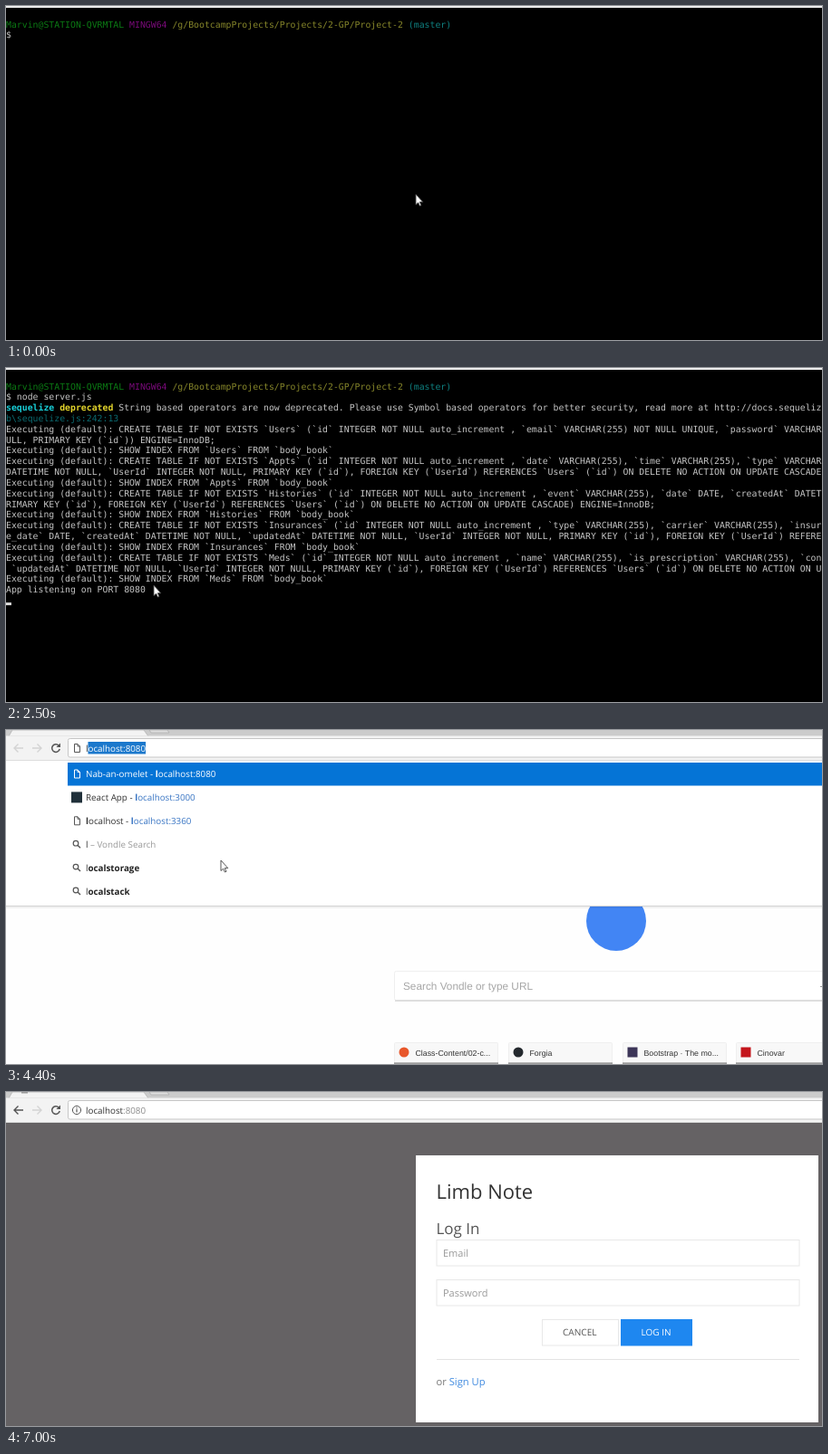
Animation, 900 px wide and 369 px high, one loop 7.1 s. Source, as an HTML page:

```html
<!DOCTYPE html>
<html lang="en">
<head>
<meta charset="utf-8">
<title>Server start and log in</title>
<style>
html, body { margin: 0; width: 100%; height: 100%; overflow: hidden; background: #000; }
svg { display: block; width: 100vw; height: 100vh; }
text { white-space: pre; text-rendering: geometricPrecision; }
.mono { font-family: "DejaVu Sans Mono", monospace; }
.ui { font-family: "Open Sans", "Noto Sans", sans-serif; }
.page { font-family: "Liberation Sans", sans-serif; }
</style>
</head>
<body>
<svg id="stage" viewBox="0 0 900 369"></svg>
<script>
const LOOP = 7100, CHAR = 5.918, ROW = 11.83;
const BROWSER = 3400, TYPE_URL = 4300, ENTER = 5350, LOADED = 5800;
const clamp = v => Math.max(0, Math.min(1, v));

const rect = (x, y, w, h, fill, extra = '') =>
  `<rect x="${x}" y="${y}" width="${w}" height="${h}" fill="${fill}" ${extra}/>`;
const circle = (x, y, r, fill, extra = '') =>
  `<circle cx="${x}" cy="${y}" r="${r}" fill="${fill}" ${extra}/>`;
const line = (d, color, width = 1.2) =>
  `<path d="${d}" fill="none" stroke="${color}" stroke-width="${width}"/>`;
const text = (x, y, s, size, fill, cls = 'ui') =>
  `<text class="${cls}" x="${x}" y="${y}" font-size="${size}" fill="${fill}">${s}</text>`;
const span = (s, fill, bold) =>
  `<tspan${fill ? ` fill="${fill}"` : ''}${bold ? ' font-weight="700"' : ''}>${s}</tspan>`;

// Terminal
const create = (name, columns) => 'Executing (default): CREATE TABLE IF NOT EXISTS `' + name +
  '` (`id` INTEGER NOT NULL auto_increment , ' + columns;
const show = name => 'Executing (default): SHOW INDEX FROM `' + name + '` FROM `body_book`';
const key = 'PRIMARY KEY (`id`), FOREIGN KEY (`UserId`) REFERENCES `Users` (`id`) ' +
  'ON DELETE NO ACTION ON UPDATE CASCADE';
const userKey = 'DATETIME NOT NULL, `UserId` INTEGER NOT NULL, ' + key;
const command = 'node server.js';
const prompt = span('Marvin@STATION-QVRMTAL ', '#0b7a14') + span('MINGW64 ', '#7a0a7a') +
  span('/g/BootcampProjects/Projects/2-GP/Project-2 ', '#86862a') + span('(master)', '#0f8080');
const output = [
  span('sequelize ', '#18cfd8', true) + span('deprecated ', '#e3d52c', true) +
    'String based operators are now deprecated. Please use Symbol based operators ' +
    'for better security, read more at http://docs.sequelizejs',
  span('b\\sequelize.js:242:13', '#0b6a70'),
  create('Users', '`email` VARCHAR(255) NOT NULL UNIQUE, `password` VARCHAR'),
  'ULL, PRIMARY KEY (`id`)) ENGINE=InnoDB;',
  show('Users'),
  create('Appts', '`date` VARCHAR(255), `time` VARCHAR(255), `type` VARCHAR'),
  userKey,
  show('Appts'),
  create('Histories', '`event` VARCHAR(255), `date` DATE, `createdAt` DATETIME'),
  key.slice(1) + ') ENGINE=InnoDB;',
  show('Histories'),
  create('Insurances', '`type` VARCHAR(255), `carrier` VARCHAR(255), `insurance'),
  'e_date` DATE, `createdAt` DATETIME NOT NULL, `updatedAt` ' + userKey,
  show('Insurances'),
  create('Meds', '`name` VARCHAR(255), `is_prescription` VARCHAR(255), `condition'),
  ' `updatedAt` ' + userKey,
  show('Meds'),
  'App listening on PORT 8080'
];
const baseline = row => 23.5 + ROW * row;
const termLine = (row, s) => text(0, baseline(row), s, 9.83, '#c4c4c4', 'mono');

function terminal(t) {
  const typed = command.slice(0, Math.max(0, Math.floor((t - 100) / 75)));
  const count = t < 1300 ? 0 : Math.min(output.length, 2 + 6 * Math.floor((t - 1300) / 100));
  let s = rect(0, 0, 900, 369, '#000') + rect(0, 0, 900, 2, '#ececec');
  s += termLine(0, prompt) + termLine(1, '$ ' + typed);
  output.slice(0, count).forEach((l, i) => s += termLine(i + 2, l));

  const cells = Math.ceil(5 * clamp((t - 2600) / 200));
  if (cells) {
    const x = (26 - cells) * CHAR;
    s += rect(x, 238, cells * CHAR + 1, 13, '#f2f2f2') +
      text(x, baseline(19), ' 8080'.slice(-cells), 9.83, '#333', 'mono');
  } else if (t >= 100 && t % 1000 < 750) {
    const [col, row] = count ? [0, count + 2] : [2 + typed.length, 1];
    s += rect(col * CHAR, baseline(row) - 1, CHAR, 3, '#ddd');
  }
  return s;
}

// Browser chrome
const fileIcon = (y, color) =>
  line(`M75.5 ${y - 4.5}h3.5l2.5 2.5v6.5h-6zM79 ${y - 4.5}v2.5h2.5`, color, 1);
const lens = y => circle(77, y - 1, 2.8, 'none', 'stroke="#555" stroke-width="1.2"') +
  line(`M79 ${y + 1}l3 3`, '#555', 1.4);
const info = circle(78, 20, 4.6, 'none', 'stroke="#555"') + line('M78 19v3.6M78 17v1.2', '#555');
const reload = line('M58.2 17.2a4.3 4.3 0 1 0 1 3.8', '#555', 1.5) +
  '<path d="M60 14.5v4.6h-4.6z" fill="#555"/>';
const stop = line('M51 16l8 8M59 16l-8 8', '#555', 1.5);

function toolbar(backColor, button, icon, address) {
  return rect(0, 0, 900, 7, '#cbcbcb') +
    '<path d="M3 7L7 0H152L157 7Z" fill="#f3f3f3" stroke="#b5b5b5" stroke-width=".8"/>' +
    '<path d="M158 0L160 3H180L178 0Z" fill="#dedede" stroke="#aaa" stroke-width=".7"/>' +
    rect(0, 6.5, 900, 27, '#f3f3f3') + rect(0, 33, 900, 1, '#dcdcdc') +
    rect(68.5, 9.5, 840, 20.5, '#fff', 'rx="2" stroke="#c6c6c6"') +
    line('M19 20H9M13.5 15.5L9 20l4.5 4.5', backColor, 1.4) +
    line('M29 20h10M34.5 15.5L39 20l-4.5 4.5', '#d4d4d4', 1.4) +
    button + icon + address;
}

const BLACK = '#24292e', ORANGE = '#e8572b';
const badge = (x, y, color, shape, r = 5.5) =>
  shape === 'o' ? circle(x, y, r, color) : rect(x - r, y - r, 2 * r, 2 * r, color);
const bookIcon = line('M387 44.5v8.5M381.5 43.5h4l1.5 1l1.5-1h4v8.5h-4l-1.5 1l-1.5-1h-4z' +
  'M383 46.5h2.5M383 49h2.5M388.5 46.5h2.5M388.5 49h2.5', '#444', 1.1);
const bookmarks = [
  [64, "The world's leading", badge(64, 48, BLACK, 'o')],
  [175, 'Marvin Doyle | Wor', badge(175, 48, '#0a73b4', 's')],
  [286, 'My Profile - Plim', badge(286, 48, '#2d8cff', 'o')],
  [387, 'Module #2 - So You', bookIcon],
  [498, 'Keypad Drills | Pra', badge(498, 48, '#a9cdec', 's')],
  [609, '(7) 24/7 openLoopR', badge(609, 48, '#d61f1f', 's', 5)],
  [720, 'TrainingNook', badge(720, 48, '#3f434a', 's', 5)],
  [808, 'Class-Content/02-c', badge(808, 48, ORANGE, 'o')]
];

let bookmarkBar = rect(0, 34, 900, 28, '#fefefe') + rect(0, 62, 900, 1, '#dedede');
for (let i = 0; i < 9; i++)
  bookmarkBar += rect(9 + i % 3 * 4, 43 + Math.floor(i / 3) * 4, 2.6, 2.6,
    ['#e0483a', '#e8a33a', '#4a9b58'][Math.floor(i / 3)]);
bookmarkBar += text(30, 51, 'Apps', 8.5, '#333');
// Long titles fade out before the next icon
for (const [x, label, icon] of bookmarks)
  bookmarkBar += icon + text(x + 15, 51, label, 8.5, '#333') +
    (label.length > 17 ? rect(x + 82, 40, 24, 16, 'url(#fade)') : '');

const tiles = [
  [428, 'Class-Content/02-c...', ORANGE, 'o'],
  [554, 'Forgia', BLACK, 'o'],
  [680, 'Bootstrap · The mo...', '#3c3558', 's'],
  [805, 'Cinovar', '#c4161c', 's']
];
let startPage = rect(0, 34, 900, 335, '#fefefe') + circle(673, 211, 33, '#4285f4') +
  rect(428.5, 266.5, 490, 32, '#fff', 'rx="2" stroke="#efefef"') +
  rect(429, 298.5, 490, 1.2, '#cfcfcf') +
  text(438, 287, 'Search Vondle or type URL', 11.8, '#a6a6a6', 'page') +
  rect(898, 283, 2, 1, '#999');
for (const [x, label, color, shape] of tiles)
  startPage += rect(x + .5, 345.5, 114, 24, '#f8f8f8', 'rx="1" stroke="#efefef"') +
    rect(x, 367.5, 115, 1.2, '#777') + badge(x + 11, 356, color, shape) +
    text(x + 23.5, 359.5, label, 8.8, '#333', 'page');

// Address suggestions follow the typed letters
function suggestions(n) {
  const host = 'localhost', typed = host.slice(0, n), stem = host.slice(0, Math.min(n, 5));
  const BLUE = '#3a76c4';
  const match = (rest, color) => span(typed, color, true) + span(host.slice(n) + rest, color);
  const more = word => stem + span(word.slice(stem.length), '#222', true);
  const rows = [
    'Nab-an-omelet - ' + match(':8080', '#fff'),
    'React App - ' + match(':3000', BLUE),
    match('', '#333') + ' - ' + match(':3360', BLUE),
    typed + span(' – Vondle Search', '#999'),
    more('localstorage'),
    more('localstack')
  ];
  const icons = [y => fileIcon(y, '#fff'), y => badge(78, y, '#20303a', 's', 6),
    y => fileIcon(y, '#555'), lens, lens, lens];
  let s = rect(0, 34, 900, 160, '#fff') + rect(0, 194, 900, 1, '#d2d2d2') +
    rect(0, 195, 900, 2, '#000', 'opacity=".05"') + rect(68, 36, 832, 25.5, '#0574d6');
  rows.forEach((r, i) => {
    const y = 48.5 + 25.9 * i;
    s += icons[i](y) + text(88, y + 3.5, r, 9.8, i ? '#333' : '#fff');
  });
  return s;
}

const urlText = text(88, 23.5, 'localhost' + span(':8080', '#8a8a8a'), 9.8, '#333');

const loginForm = rect(452, 70, 444, 295, '#fff') +
  text(474.5, 118, 'Limb Note', 22, '#333') + text(474.5, 157, 'Log In', 17, '#555') +
  [[163, 'Email'], [207, 'Password']].map(([y, label]) =>
    rect(475, y + .5, 400, 28.5, '#fff', 'stroke="#e8e8e8"') +
    text(482, y + 19, label, 11, '#999')).join('') +
  rect(591.5, 251.5, 84, 28.5, '#fff', 'stroke="#e8e8e8"') + text(614, 269.3, 'CANCEL', 10.1, '#555') +
  rect(678, 251, 79, 29.5, '#1e87f0') + text(700.5, 269.3, 'LOG IN', 10, '#fff') +
  rect(475, 295, 400, 1, '#e4e4e4') +
  text(474.5, 324, 'or ' + span('Sign Up', '#3f8ae0'), 11.2, '#777');

function browser(t) {
  if (t >= LOADED) {
    return rect(0, 34, 900, 335, '#fff') +
      `<g opacity="${clamp((t - LOADED) / 200)}">` + rect(0, 34, 900, 335, '#656264') + loginForm + '</g>' +
      toolbar('#555', reload, info, urlText) + rect(17, 0, 7, 1.5, '#999');
  }
  if (t >= ENTER)
    return startPage + bookmarkBar + toolbar('#d4d4d4', stop, info, urlText);
  if (t < TYPE_URL)
    return startPage + bookmarkBar +
      toolbar('#d4d4d4', reload, lens(20), rect(87.5, 12.5, 1.3, 13, '#444'));

  const n = Math.min(9, 1 + Math.floor((t - TYPE_URL) / 110));
  const typed = 'localhost'.slice(0, n);
  const x = 88 + measure(typed);
  const rest = 'localhost:8080'.slice(n);
  return startPage + suggestions(n) + toolbar('#d4d4d4', reload, fileIcon(20, '#555'),
    text(88, 23.5, typed, 9.8, '#333') + rect(x, 13, measure(rest), 13.5, '#1b78cc') +
    text(x, 23.5, rest, 9.8, '#fff'));
}

const pen = document.createElement('canvas').getContext('2d');
function measure(s) {
  pen.font = '98px "Open Sans", "Noto Sans", sans-serif';
  return pen.measureText(s).width / 10;
}

// Pointer path: time, x, y
const path = [[0, 452, 208], [2050, 452, 208], [2550, 155, 241], [2600, 155, 241], [2800, 125, 241],
  [2900, 125, 241], [3200, 200, 380], [3300, 215, 380], [3500, 245, 188], [3700, 245, 188],
  [4200, 237, 144], [LOADED, 237, 144]];
function pointer(t) {
  const i = path.findIndex(p => p[0] > t);
  if (i < 1) return '';
  const [a, b] = [path[i - 1], path[i]];
  let k = (t - a[0]) / (b[0] - a[0]);
  k = k * k * (3 - 2 * k);
  const at = j => a[j] + (b[j] - a[j]) * k;
  return `<path transform="translate(${at(1)} ${at(2)})" fill="#fff" stroke="#444" stroke-width=".9"
    d="M0 0V11.5L2.6 9.2L4.4 13L6 12.3L4.3 8.6H7.8Z"/>`;
}

const defs = `<defs><linearGradient id="fade">
  <stop stop-color="#fefefe" stop-opacity="0"/><stop offset=".5" stop-color="#fefefe"/>
</linearGradient></defs>`;
const stage = document.getElementById('stage');
const start = performance.now();
let last = '';
function frame() {
  const t = (performance.now() - start) % LOOP;
  const markup = defs + (t < BROWSER ? terminal(t) : browser(t)) + pointer(t);
  if (markup !== last) stage.innerHTML = last = markup;
  requestAnimationFrame(frame);
}
frame();
</script>
</body>
</html>
```
